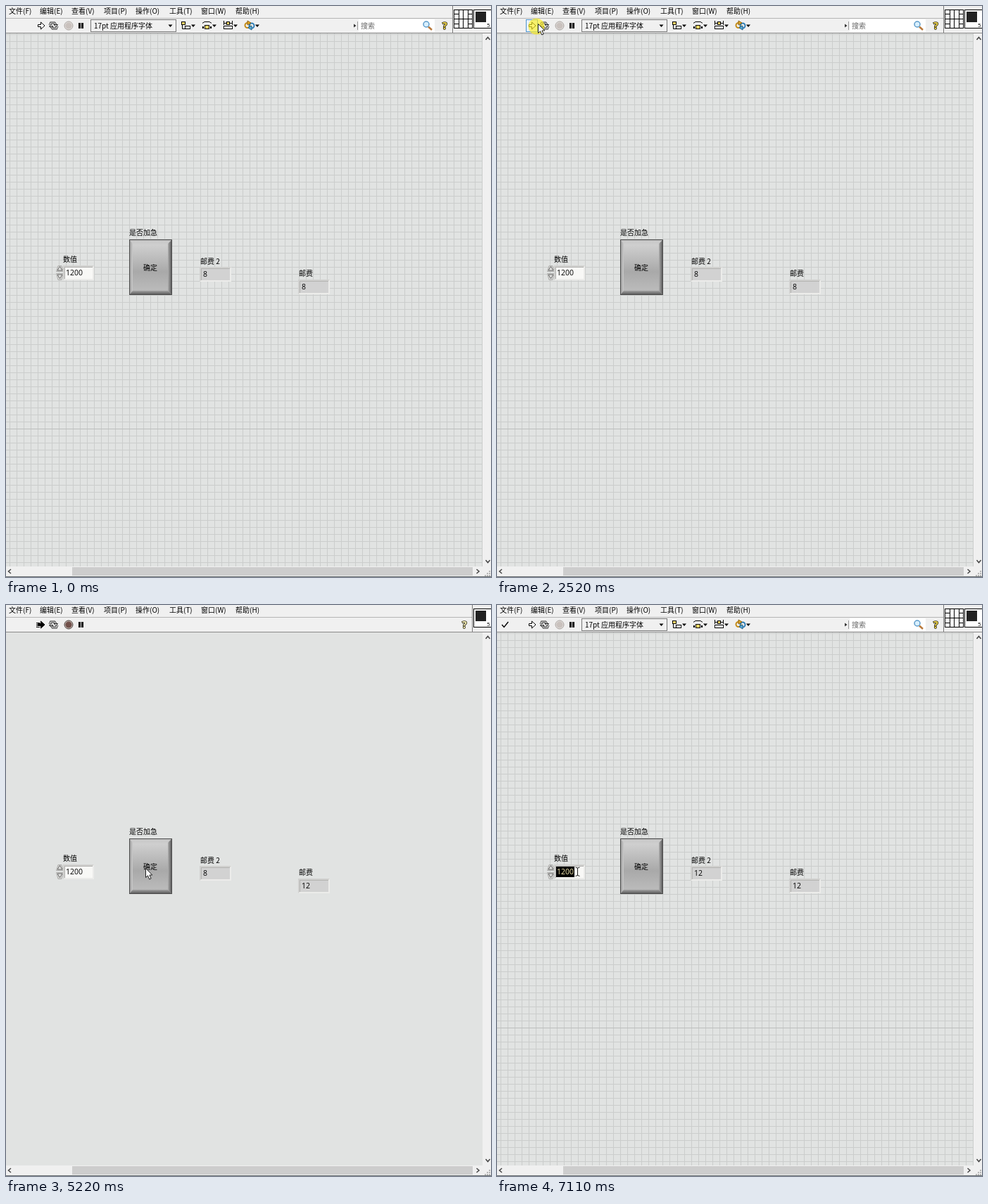
Write an HTML page with a canvas that moves like this. It is 689 px wide and 812 px high and loops after 8 s.

```html
<!DOCTYPE html>
<html lang="zh-CN">
<head>
<meta charset="utf-8">
<style>
html, body { margin: 0; width: 100%; height: 100%; overflow: hidden; background: #e1e3e2; }
canvas { display: block; }
</style>
</head>
<body>
<canvas id="stage" width="689" height="812"></canvas>
<script>
const ctx = document.getElementById('stage').getContext('2d');
const LOOP = 8000;
const CJK = '"Noto Sans CJK SC", "Noto Sans CJK", sans-serif';
const LATIN = '"Open Sans", "Noto Sans", sans-serif';

// Pointer keys: time, x, y
const PATH = [
  [130, 640, 800], [890, 12, 173], [960, 16, 150], [1300, 47, 39], [1710, 58, 26],
  [2780, 58, 26], [2840, 64, 32], [3190, 350, 350], [3400, 387, 455], [3590, 385, 463],
  [4010, 127, 375], [5160, 127, 375], [5220, 198, 375], [5430, 218, 379],
  [5780, 212, 371], [5980, 212, 367], [6380, 212, 367], [6850, 114, 379], [8000, 114, 379]
];

function rect(x, y, w, h, fill) {
  ctx.fillStyle = fill;
  ctx.fillRect(x, y, w, h);
}

function frame(x, y, w, h, color) {
  ctx.strokeStyle = color;
  ctx.lineWidth = 1;
  ctx.strokeRect(x + .5, y + .5, w - 1, h - 1);
}

function poly(points, fill, stroke) {
  ctx.beginPath();
  for (let i = 0; i < points.length; i += 2) ctx.lineTo(points[i], points[i + 1]);
  ctx.closePath();
  if (fill) { ctx.fillStyle = fill; ctx.fill(); }
  if (stroke) { ctx.strokeStyle = stroke; ctx.lineWidth = 1; ctx.stroke(); }
}

function line(points, color = '#000', width = 1) {
  ctx.beginPath();
  for (let i = 0; i < points.length; i += 2) ctx.lineTo(points[i], points[i + 1]);
  ctx.strokeStyle = color;
  ctx.lineWidth = width;
  ctx.stroke();
}

function disc(x, y, r, fill, stroke, width = 1) {
  ctx.beginPath();
  ctx.arc(x, y, r, 0, 7);
  if (fill) { ctx.fillStyle = fill; ctx.fill(); }
  if (stroke) { ctx.strokeStyle = stroke; ctx.lineWidth = width; ctx.stroke(); }
}

function gradient(x0, y0, x1, y1, stops) {
  const g = ctx.createLinearGradient(x0, y0, x1, y1);
  for (const [at, color] of stops) g.addColorStop(at, color);
  return g;
}

// y is the vertical centre of the glyphs
function label(text, x, y, color = '#000', font = '10px ' + CJK) {
  ctx.font = font;
  ctx.fillStyle = color;
  ctx.fillText(text, x, y + 3.8);
}

const number = (text, x, y, color) => label(text, x, y, color, '10.5px ' + LATIN);
const dropMark = x => poly([x - 3, 26.5, x + 3, 26.5, x, 30], '#000');

function grid() {
  for (let x = 5; x < 677; x += 10.02) rect(Math.round(x), 39, 1, 758, '#cbcdcc');
  for (let y = 40; y < 797; y += 10.02) rect(0, Math.round(y), 677, 1, '#cbcdcc');
  rect(0, 601, 677, 1, '#bcbebd');
}

function loopArrows() {
  for (const turn of [0, Math.PI]) {
    ctx.save();
    ctx.translate(67.5, 28);
    ctx.rotate(turn);
    const bend = [-5.5, -.5, -4, -4, 1.5, -4, 3.5, -1.5];
    line(bend, '#222', 2.8);
    line(bend, '#fff', 1.2);
    poly([.5, -1.5, 6, -1.5, 3.5, 1.5], '#fff', '#222');
    ctx.restore();
  }
}

function layoutIcons() {
  rect(249, 22, 6, 5, '#000'); rect(250, 23, 4, 3, '#f5d76a');
  rect(254, 28, 8, 5, '#000'); rect(255, 29, 6, 3, '#fff');
  line([250.5, 27, 250.5, 32.5, 254, 32.5]);
  line([279, 24.5, 282, 22.5, 289, 22.5, 292, 24.5]);
  rect(282, 27, 7, 6, '#000'); rect(283, 28, 5, 4, '#f5d76a');
  rect(279, 29, 2, 3, '#000'); rect(290, 29, 2, 3, '#000');
  line([309.5, 21, 309.5, 27]); line([321.5, 21, 321.5, 27]); line([310, 24.5, 321, 24.5]);
  rect(313, 22, 5, 5, '#000'); rect(314, 23, 3, 3, '#f5d76a');
  rect(309, 28, 13, 5, '#000'); rect(310, 29, 11, 3, '#fff');
  disc(343, 27.5, 3.5, null, '#c38b17', 2);
  disc(349, 28, 3.5, null, '#2d7db5', 2);
  poly([343, 21, 348, 24, 343, 27], '#e5ad29', '#8c5f10');
  poly([349, 28, 344, 31, 349, 34], '#5eb4dd', '#235f88');
  [266, 296, 326, 357].forEach(dropMark);
}

function helpMark(x, fill) {
  ctx.font = 'bold 14px ' + LATIN;
  ctx.lineWidth = 1.6;
  ctx.strokeStyle = '#2d2a16';
  ctx.strokeText('?', x, 33);
  ctx.fillStyle = fill;
  ctx.fillText('?', x, 33);
}

function connectorPane() {
  rect(636, 5, 27, 27, '#fff');
  frame(636, 5, 27, 27, '#000');
  for (const x of [643, 649, 656]) rect(x, 5, 1, 27, '#000');
  for (const y of [11, 18, 25]) {
    rect(636, y, 7, 1, '#000');
    rect(656, y, 7, 1, '#000');
  }
  rect(643, 18, 13, 1, '#000');
}

function toolbar(running, hover, editing) {
  rect(0, 0, 689, 38, '#f0f0f0');
  rect(0, 17, running ? 662 : 635, 1, '#b4b4b4');
  rect(0, 38, 689, 1, '#8a8a8a');
  const menu = ['文件(F)', 4, '编辑(E)', 48, '查看(V)', 93, '项目(P)', 139,
    '操作(O)', 184, '工具(T)', 232, '窗口(W)', 277, '帮助(H)', 326];
  for (let i = 0; i < menu.length; i += 2) label(menu[i], menu[i + 1], 7.3);

  if (hover) {
    const x = hover === 'run' ? 41 : 59;
    rect(x, 19, 17, 18, '#e8f1f9');
    frame(x, 19, 17, 18, '#4d94d0');
  }
  if (editing) line([7, 28, 10, 31.5, 16, 24], '#000', 1.4);
  const arrow = [45.5, 26.5, 49.5, 26.5, 49.5, 23, 55, 28, 49.5, 33, 49.5, 29.5, 45.5, 29.5];
  poly(arrow, running ? '#000' : '#fff', '#000');
  if (running) for (const y of [25, 27, 29, 31]) rect(43, y, 5, 1, '#000');
  loopArrows();
  disc(89, 28, 6, running ? '#c9bfba' : '#e2e0de', running ? '#4a3f3b' : '#aaa39f');
  disc(89, 28, 4.6, running ? '#71504a' : '#c9c1bd');
  rect(103, 24, 3, 8, '#000');
  rect(107, 24, 3, 8, '#000');

  if (running) {
    helpMark(648, '#f8f0b8');
    rect(662, 0, 1, 38, '#777');
  } else {
    rect(120, 19, 122, 18, '#f0f0f0');
    frame(120, 19, 122, 18, '#777');
    label('17pt 应用程序字体', 125, 28);
    dropMark(233.5);
    layoutIcons();
    poly([494, 25.5, 497.5, 28, 494, 30.5], '#333');
    rect(499, 22, 1, 12, '#999');
    rect(501, 19, 108, 18, '#fff');
    label('搜索', 504, 28, '#666');
    line([600, 29.5, 605, 34], '#b9793b', 2.5);
    disc(597, 26, 4, '#d8efff', '#5d9bc9', 1.5);
    helpMark(620, '#f4d848');
    rect(634, 0, 1, 38, '#777');
    connectorPane();
  }
  rect(664, 5, 25, 27, '#fff');
  frame(664, 5, 26, 27, '#000');
  rect(667, 8, 15, 15, '#222');
  label('5', 683, 26, '#000', '8px ' + LATIN);
}

function scrollbars() {
  rect(677, 39, 12, 758, '#f0f0f0');
  rect(0, 797, 689, 14, '#f0f0f0');
  rect(94, 798, 569, 12, '#cdcdcd');
  line([681.5, 48, 684.5, 44.5, 687.5, 48], '#444', 1.5);
  line([681.5, 788, 684.5, 791.5, 687.5, 788], '#444', 1.5);
  line([7, 801, 3.5, 804, 7, 807], '#444', 1.5);
  line([668.5, 801, 672, 804, 668.5, 807], '#444', 1.5);
  for (let i = 0; i < 3; i++)
    for (let j = 0; j <= i; j++) rect(686 - j * 3, 803 + i * 3, 2, 2, '#b5b5b5');
  rect(0, 811, 689, 1, '#676e70');
}

function field(x, y, w, fill) {
  rect(x, y, w, 21, '#d0d0ce');
  poly([x, y + 21, x + w, y + 21, x + w, y, x + w - 3, y + 3, x + w - 3, y + 18, x + 3, y + 18], '#ececea');
  rect(x + 2, y + 2, w - 4, 17, '#b4b4b2');
  rect(x + 3, y + 3, w - 5, 16, fill);
}

function spinner() {
  poly([71.5, 377.5, 74, 369.5, 79, 369.5, 81.5, 377.5], '#d2d2d0', '#b0b0ae');
  poly([71.5, 380.5, 81.5, 380.5, 79, 389.5, 74, 389.5], '#d2d2d0', '#b0b0ae');
  poly([73, 376, 76.5, 370.5, 80, 376], '#e6e6e4', '#666');
  poly([73, 382, 80, 382, 76.5, 387.5], '#e6e6e4', '#666');
}

function button(pressed) {
  const face = pressed
    ? [[0, '#c2c2c2'], [.2, '#cbcbcb'], [.85, '#adadad'], [1, '#959595']]
    : [[0, '#c4c4c4'], [.1, '#cfcfcf'], [.58, '#a9a9a9'], [.9, '#bababa'], [1, '#a8a8a8']];
  rect(175, 332, 61, 79, gradient(0, 332, 0, 411, face));
  poly([176, 333, 180, 338, 180, 405, 176, 410],
    gradient(176, 0, 180, 0, [[0, '#a0a0a0'], [1, pressed ? '#b8b8b8' : '#cacaca']]));
  poly([235, 333, 235, 410, 230, 405, 230, 338],
    gradient(230, 0, 236, 0, [[0, '#aeaeae'], [1, '#4c4c4c']]));
  poly([176, 410, 235, 410, 230, 405, 180, 405],
    gradient(0, 404, 0, 411, [[0, '#aeaeae'], [1, '#505050']]));
  frame(175, 332, 61, 79, '#4c4c4c');
  label('确定', 195, 372);
}

function handles() {
  for (const x of [178, 205, 233])
    for (const y of [335, 371, 408])
      if (x !== 205 || y !== 371) {
        rect(x - 3, y - 3, 6, 6, '#fff');
        rect(x - 2.5, y - 2.5, 5, 5, '#0078d7');
      }
}

function panel(state) {
  label('数值', 81, 360);
  label('是否加急', 175, 322);
  label('邮费 2', 276, 363);
  label('邮费', 416, 380.5);
  spinner();
  field(81, 369, 44, '#f8f8f6');
  if (state.textSelected) rect(84, 372, 26, 15, '#000');
  number('1200', 85, 379.5, state.textSelected ? '#f5e9b0' : '#000');
  button(state.pressed);
  field(275, 371, 45, '#d2d2d2');
  number(state.feeTwo, 280, 381.5);
  field(415, 389, 45, '#d2d2d2');
  number(state.fee, 420, 399.5);
  if (state.selected) handles();
}

function pointerAt(t) {
  if (t < PATH[0][0]) return null;
  const i = PATH.findIndex(key => key[0] > t);
  const [t0, x0, y0] = PATH[i - 1], [t1, x1, y1] = PATH[i];
  const k = (t - t0) / (t1 - t0);
  return [Math.round(x0 + (x1 - x0) * k), Math.round(y0 + (y1 - y0) * k)];
}

function pointer(t, running) {
  const at = pointerAt(t);
  if (!at) return;
  const [x, y] = at;
  if (t > 2440 && t < 2580) disc(x - 2, y + 3, 11.5, 'rgba(255,240,30,.65)');
  if (t >= 5980 && (t < 6380 || t >= 6780)) {
    const h = t < 6380 ? 4 : 6;
    line([x - 2.5, y - h, x + .5, y - h + 1, x + 3.5, y - h], '#222');
    line([x + .5, y - h + 1, x + .5, y + h], '#222');
    line([x - 2.5, y + h + .5, x + .5, y + h - .5, x + 3.5, y + h + .5], '#222');
  } else if (!running && y >= 38) {
    rect(x - 4, y, 9, 1, '#000');
    rect(x, y - 4, 1, 9, '#000');
  } else {
    ctx.save();
    ctx.translate(x + .5, y - .5);
    poly([0, 0, 0, 13, 3, 10.3, 5.2, 15.5, 7.6, 14.5, 5.4, 9.5, 9.3, 9.5], '#fff', '#222');
    ctx.restore();
  }
}

function draw(t) {
  const running = t >= 2580 && t < 5980;
  const hover = t >= 1640 && t < 2580 ? 'run' : t >= 2580 && t < 3660 ? 'loop' : null;
  rect(0, 0, 689, 812, '#e1e3e2');
  if (!running) grid();
  panel({
    fee: t < 2580 ? '8' : '12',
    feeTwo: t < 5980 ? '8' : '12',
    pressed: t >= 5980 && t < 6450,
    selected: t >= 6050 && t < 6450,
    textSelected: t >= 7040
  });
  toolbar(running, hover, t >= 6900);
  scrollbars();
  pointer(t, running);
}

function tick(now) {
  draw(now % LOOP);
  requestAnimationFrame(tick);
}
requestAnimationFrame(tick);
</script>
</body>
</html>
```
